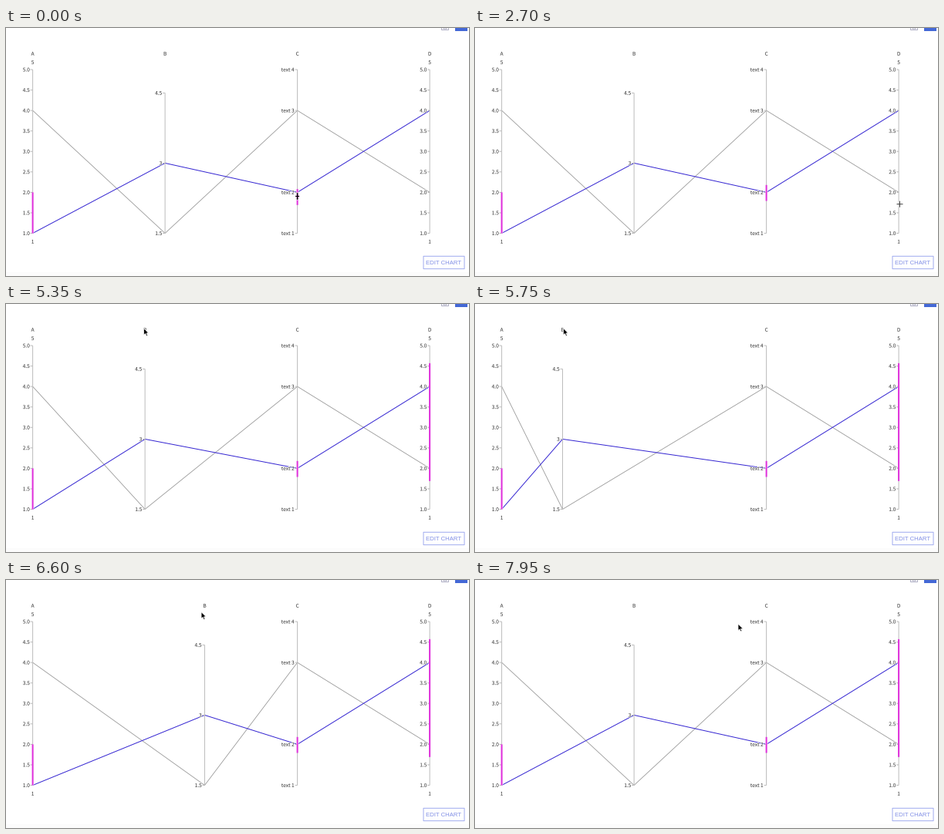
These frames come from a looping animation (600x322 px, 8000 ms). A matplotlib script:

```python
import numpy as np
import matplotlib.pyplot as plt
from matplotlib.animation import FuncAnimation
from matplotlib.patches import Polygon, Rectangle
from matplotlib.patheffects import withStroke
from matplotlib.transforms import Affine2D

W, H, DPI = 600, 322, 100
STEP, FRAMES = 50, 160
PX = 72 / DPI

TOP, BOTTOM = 54, 266.5
XA, XB, XC, XD = 34.6 + 171.5 * np.arange(4)
INK, AXIS, GREY = "#2b2b2b", "#bcbcbc", "#959595"
BLUE, PINK = "#3627d2", "#e02fdc"

fig = plt.figure(figsize=(W / DPI, H / DPI), dpi=DPI, facecolor="white")
ax = fig.add_axes([0, 0, 1, 1])
ax.set_xlim(0, W)
ax.set_ylim(H, 0)
ax.axis("off")


def height(value, low=1):
    """Pixel row of a value on an axis running from low to 5."""
    return BOTTOM + (value - low) / (5 - low) * (TOP - BOTTOM)


def line(xs, ys, color, width=1.0, **kw):
    return ax.plot(xs, ys, color=color, lw=width * PX, snap=False,
                   solid_capstyle="butt", **kw)[0]


def label(x, y, text, ha="center", tr=None):
    ax.text(x, y + 2.4, text, ha=ha, va="baseline", color=INK,
            family="Noto Sans CJK JP", fontsize=6.5 * PX, zorder=6,
            transform=tr or ax.transData,
            path_effects=[withStroke(linewidth=1.1 * PX, foreground="white")])


def draw_axis(x, name, values, form, low=1, ends=False, tr=None):
    tr = tr or ax.transData
    line([x, x], [height(values[-1], low), BOTTOM], AXIS, zorder=4,
         transform=tr)
    for k, v in enumerate(values):
        y = height(v, low)
        line([x - 3, x], [y, y], AXIS, zorder=4, transform=tr)
        label(x - 3.8, y, form.format(v=v, k=k + 1), "right", tr)
    label(x, 33.3, name, tr=tr)
    if ends:
        label(x, 44.5, "5")
        label(x, 277.3, "1")


class Brush:
    def __init__(self, x):
        self.x = x
        self.parts = [line([], [], "white", 3.2, zorder=3),
                      line([], [], PINK, 2, zorder=7)]

    def set(self, low, high):
        for part in self.parts:
            part.set_data([self.x, self.x], [height(low), height(high)])


class Cursor:
    """Artists drawn around the origin and moved together."""

    def __init__(self):
        self.shift = Affine2D()
        self.tr = self.shift + ax.transData
        self.parts = []

    def poly(self, points):
        self.parts.append(ax.add_patch(Polygon(
            points, fc="black", ec="white", lw=0.7 * PX, zorder=10,
            transform=self.tr)))
        return self

    def plus(self, wide, tall, color, width):
        for xs, ys in (([-wide, wide], [0, 0]), ([0, 0], [-tall, tall])):
            self.parts.append(line(xs, ys, color, width, zorder=11,
                                   transform=self.tr))
        return self

    def set(self, x, y, on):
        self.shift.clear().translate(x, y)
        for part in self.parts:
            part.set_visible(on)


# Page around the chart
ax.add_patch(Rectangle((0, 317), W, 5, fc="#fcfcfc", lw=0))
ax.add_patch(Rectangle((582, -12.5), 16, 16, fc="#4468d6", lw=0))
for inset, bottom in ((0, 2.5), (2.5, 1)):
    left, right = 564.5 + inset, 573.5 - inset
    line([left, left, right, right], [-1, bottom, bottom, -1], "#a9a9c0", 0.9)
ax.add_patch(Rectangle((541, 296.3), 53, 16.4, fc="white", ec="#a0abef",
                       lw=PX, joinstyle="round", snap=False))
ax.text(567.4, 307.2, "EDIT CHART", ha="center", va="baseline",
        color="#8290e6", family="Liberation Sans", fontsize=7.75 * PX)

# Chart
b_shift = Affine2D()
halves = np.arange(1, 5.5, 0.5)
draw_axis(XA, "A", halves, "{v:.1f}", ends=True)
draw_axis(XB, "B", [1.5, 3, 4.5], "{v:g}", low=1.5, tr=b_shift + ax.transData)
draw_axis(XC, "C", [1, 2, 4, 5], "text {k}")
draw_axis(XD, "D", halves, "{v:.1f}", ends=True)
grey_row = line([], [], GREY, 0.8, zorder=1)
blue_row = line([], [], BLUE, 1, zorder=2)
brush_a, brush_c, brush_d = Brush(XA), Brush(XC), Brush(XD)
brush_a.set(1, 2)

arrow = Cursor().poly([(0, 0), (0, 8.7), (2, 6.9), (3.4, 10), (4.9, 9.4),
                       (3.5, 6.4), (6.2, 6.2)])
cross = Cursor().plus(4, 4, "#444444", 1)
resize = Cursor().plus(2.5, 4, "black", 1.3)
for s in (-1, 1):
    resize.poly([(-2.2, 2.6 * s), (0, 5 * s), (2.2, 2.6 * s)])

# Pointer trips: start and end in ms, then where each one arrives
TRIPS = [(800, 2400, 550.5, 228.7), (2750, 3500, 550.5, 76.7),
         (3750, 4450, 74.5, 124), (4450, 5000, 204, 31.5)]
BRUSH_START = TRIPS[1][0]
GRAB, DROP, END = 5250, 7550, 7950


def ease(t, start, end):
    u = min(max((t - start) / (end - start), 0), 1)
    return u * u * (3 - 2 * u)


def swing(t, middle, reach):
    """Side-to-side drag, furthest left at 5750 ms."""
    return middle - reach * np.cos(np.pi * (t - 5750) / 840)


def pointer(t):
    pos = np.array([XC, 218.5])
    for start, end, *goal in TRIPS:
        pos += ease(t, start, end) * (goal - pos)
    if t >= GRAB:
        pos[0] = swing(min(t, DROP), 183.8, 69.3)
        pos[1] += 11 * ease(t, 5750, 6800)
        pos += ease(t, DROP, END) * (np.array([341, 57]) - pos)
    return pos


def axis_b(t):
    if t < GRAB:
        return XB
    x = swing(min(t, DROP), 185.5, 72)
    return x + (XB - x) * ease(t, DROP, DROP + 250)


def update(i):
    t = i * STEP
    x, y = pointer(t)
    xb = axis_b(t)

    b_shift.clear().translate(xb - XB, 0)
    xs = [XA, xb, XC, XD]
    grey_row.set_data(xs, [height(4), BOTTOM, height(4), height(2)])
    blue_row.set_data(xs, [height(1), height(3, 1.5), height(2), height(4)])

    snap = 0.1 * ease(t, 50, 300)
    brush_c.set(1.69 + snap, 2.08 + snap)
    reach = 1.69 + 2.88 * ease(t, *TRIPS[1][:2])
    brush_d.set(1.69 if t > BRUSH_START else np.nan, reach)

    # The row leaves the selection until the new range reaches its value
    picked = t <= BRUSH_START or reach >= 4
    blue_row.set_color(BLUE if picked else GREY)

    on_c = t < 2000 and abs(x - XC) < 7
    on_d = t < 4000 and abs(x - XD) < 7
    resize.set(x, y, on_c)
    cross.set(x, y, on_d)
    arrow.set(x, y, not (on_c or on_d))
    return []


anim = FuncAnimation(fig, update, frames=FRAMES, interval=STEP,
                     init_func=lambda: update(0), repeat=True,
                     repeat_delay=0, blit=False)
plt.show()
```
